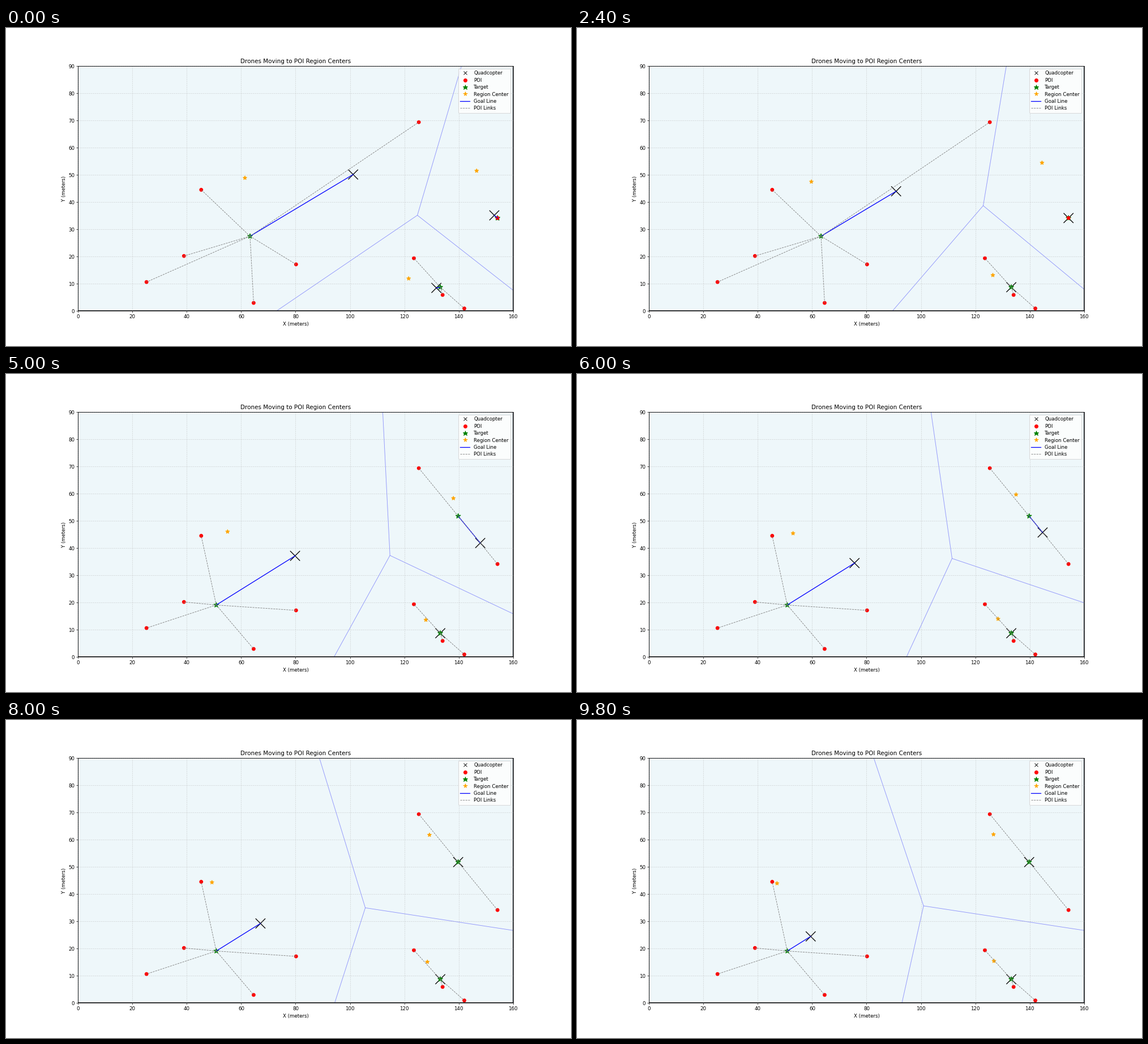
Animation of 998 by 561 pixels, one loop 10000 ms. Source, as a matplotlib script:

```python
import numpy as np
import matplotlib.pyplot as plt
from matplotlib.animation import FuncAnimation
from matplotlib.lines import Line2D
from matplotlib.patches import Polygon, Rectangle

STAGE_W, STAGE_H, DPI = 998, 561, 62.375
WIDTH, HEIGHT = 160, 90
FRAMES, INTERVAL = 50, 200
SPEED = 1.0  # metres per frame

POIS = np.array([
    (45.30, 44.56), (38.95, 20.23), (25.18, 10.65), (80.18, 17.15),
    (64.58, 2.98), (125.33, 69.42), (154.27, 34.18), (123.52, 19.40),
    (134.08, 5.92), (142.07, 0.94),
])
START = np.array([(102.03, 50.69), (152.33, 35.82), (130.80, 8.32)])


def clip_half_plane(poly, normal, limit):
    """Keep the part of poly where point . normal <= limit."""
    kept = []
    for p, q in zip(poly, np.roll(poly, -1, axis=0)):
        dp, dq = p @ normal - limit, q @ normal - limit
        if dp <= 0:
            kept.append(p)
        if dp * dq < 0:
            kept.append(p + (q - p) * dp / (dp - dq))
    return np.array(kept)


def voronoi_cell(i, sites):
    cell = np.array([(0, 0), (WIDTH, 0), (WIDTH, HEIGHT), (0, HEIGHT)], float)
    for j, other in enumerate(sites):
        if j != i:
            normal = other - sites[i]
            cell = clip_half_plane(cell, normal, normal @ (other + sites[i]) / 2)
    return cell


def centroid(poly):
    nxt = np.roll(poly, -1, axis=0)
    cross = poly[:, 0] * nxt[:, 1] - nxt[:, 0] * poly[:, 1]
    return ((poly + nxt) * cross[:, None]).sum(axis=0) / (3 * cross.sum())


def advance(pos, goal):
    gap = goal - pos
    dist = np.hypot(*gap)
    return goal.copy() if dist <= SPEED else pos + gap / dist * SPEED


def simulate():
    """Regions and goals come from the positions before each move."""
    states, drones = [], START.copy()
    for _ in range(FRAMES):
        cells = [voronoi_cell(i, drones) for i in range(len(drones))]
        dist = np.linalg.norm(POIS[:, None] - drones[None], axis=2)
        owner = dist.argmin(axis=1)
        goals = np.array([POIS[owner == i].mean(axis=0)
                          for i in range(len(drones))])
        drones = np.array([advance(p, g) for p, g in zip(drones, goals)])
        centers = np.array([centroid(c) for c in cells])
        states.append((drones, cells, owner, goals, centers))
    return states


STATES = simulate()

fig = plt.figure(figsize=((STAGE_W + 1e-6) / DPI, (STAGE_H + 1e-6) / DPI), dpi=DPI)
ax = fig.add_axes((0.1275, 0.11, 0.77, 0.77))
ax.set_facecolor("#eef7fa")
ax.set_xlim(0, WIDTH)
ax.set_ylim(0, HEIGHT)
ax.set_title("Drones Moving to POI Region Centers")
ax.set_xlabel("X (meters)")
ax.set_ylabel("Y (meters)")
ax.grid(True, linestyle="--", alpha=0.5)

regions = [ax.add_patch(Polygon(cell, closed=True, fill=False, lw=1,
                                edgecolor=(0, 0, 1, 0.22)))
           for cell in STATES[0][1]]
ax.add_patch(Rectangle((0, 0), WIDTH, HEIGHT, fill=False,
                       edgecolor="black", lw=2))


def marks(points, marker, size, color):
    # One colour per point keeps markers at sub-pixel positions.
    return ax.scatter(*points.T, marker=marker, s=size,
                      c=[color] * len(points), linewidths=1.5)


drone_marks = marks(START, "x", 400, "black")
center_marks = marks(START, "*", 60, "orange")
goal_marks = marks(START, "*", 100, "green")
marks(POIS, "o", 40, "red")

goal_lines = [ax.plot([], [], color="blue", lw=1.5)[0] for _ in START]
links = [ax.plot([], [], color="gray", ls="--", lw=1)[0] for _ in POIS]


def key(marker, color, size, label):
    return Line2D([], [], ls="none", marker=marker, color=color,
                  markersize=size, label=label)


ax.legend(loc="upper right", labelspacing=0.4, handles=[
    key("x", "black", 8, "Quadcopter"),
    key("o", "red", 7, "POI"),
    key("*", "green", 10, "Target"),
    key("*", "orange", 8.5, "Region Center"),
    Line2D([], [], color="blue", lw=1.5, label="Goal Line"),
    Line2D([], [], color="gray", ls="--", lw=1, label="POI Links"),
])


def join(line, a, b):
    line.set_data([a[0], b[0]], [a[1], b[1]])


def update(frame):
    drones, cells, owner, goals, centers = STATES[frame]
    drone_marks.set_offsets(drones)
    goal_marks.set_offsets(goals)
    center_marks.set_offsets(centers)
    for region, cell in zip(regions, cells):
        region.set_xy(cell)
    for line, drone, goal in zip(goal_lines, drones, goals):
        join(line, drone, goal)
    for line, poi, i in zip(links, POIS, owner):
        join(line, goals[i], poi)
    return []


anim = FuncAnimation(fig, update, frames=FRAMES, interval=INTERVAL,
                     repeat=True, repeat_delay=0)
plt.show()
```
